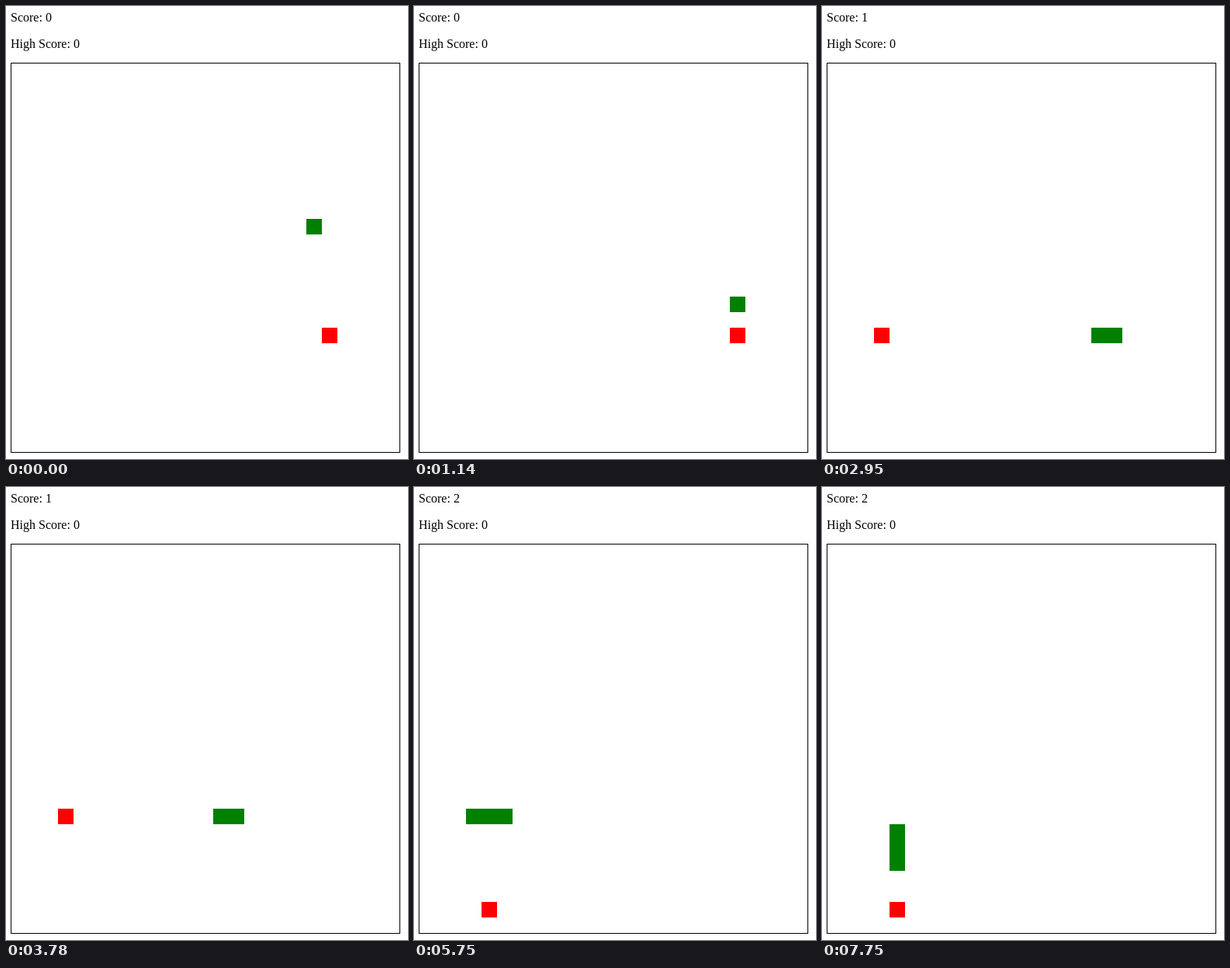
An HTML page with a canvas that plays this animation: 518 by 583 pixels, repeating every 8000 ms.

```html
<!DOCTYPE html>
<html lang="en">
<head>
<meta charset="utf-8">
<title>Snake</title>
<style>
  html, body { margin: 0; width: 100%; height: 100%; overflow: hidden; background: #fff; }
  p { position: absolute; left: 6px; margin: 0; color: #000; font: 16px/17px "Liberation Serif", "Times New Roman", serif; }
  #score { top: 6px; }
  #high { top: 40px; }
  canvas { position: absolute; left: 6px; top: 73px; border: 1px solid #000; }
</style>
</head>
<body>
<p id="score">Score: 0</p>
<p id="high">High Score: 0</p>
<canvas id="board" width="500" height="500"></canvas>
<script>
const LOOP = 8000, CELL = 20;
const TICK = 200, FIRST_TICK = 96;
const FOODS = [[20, 17], [3, 17], [4, 23]];
// Corners of the route taken by the head.
const TURNS = [[19, 10], [20, 10], [20, 19], [18, 19], [18, 17], [3, 17], [3, 14], [4, 14], [4, 20]];

const sameCell = (a, b) => a[0] === b[0] && a[1] === b[1];

// Every cell from corner to corner, one per tick.
function walk(turns) {
  const cells = [turns[0]];
  for (const target of turns.slice(1)) {
    let cell = cells.at(-1);
    while (!sameCell(cell, target)) {
      cell = cell.map((value, axis) => value + Math.sign(target[axis] - value));
      cells.push(cell);
    }
  }
  return cells;
}

const route = walk(TURNS);
const mealSteps = FOODS.map(food => route.findIndex(cell => sameCell(cell, food)))
  .filter(step => step >= 0);

const scoreLine = document.getElementById('score');
const board = document.getElementById('board').getContext('2d');

function fillCells(cells, color) {
  board.fillStyle = color;
  for (const [x, y] of cells) board.fillRect(x * CELL, y * CELL, CELL, CELL);
}

function draw(time) {
  const ticks = Math.floor((time - FIRST_TICK) / TICK) + 1;
  const step = Math.min(ticks, route.length - 1);
  const score = mealSteps.filter(meal => meal <= step).length;

  scoreLine.textContent = `Score: ${score}`;
  board.clearRect(0, 0, 500, 500);
  fillCells([FOODS[score]], 'red');
  fillCells(route.slice(Math.max(0, step - score), step + 1), 'green');
}

let startTime;
function frame(now) {
  startTime ??= now;
  draw((now - startTime) % LOOP);
  requestAnimationFrame(frame);
}
draw(0);
requestAnimationFrame(frame);
</script>
</body>
</html>
```
